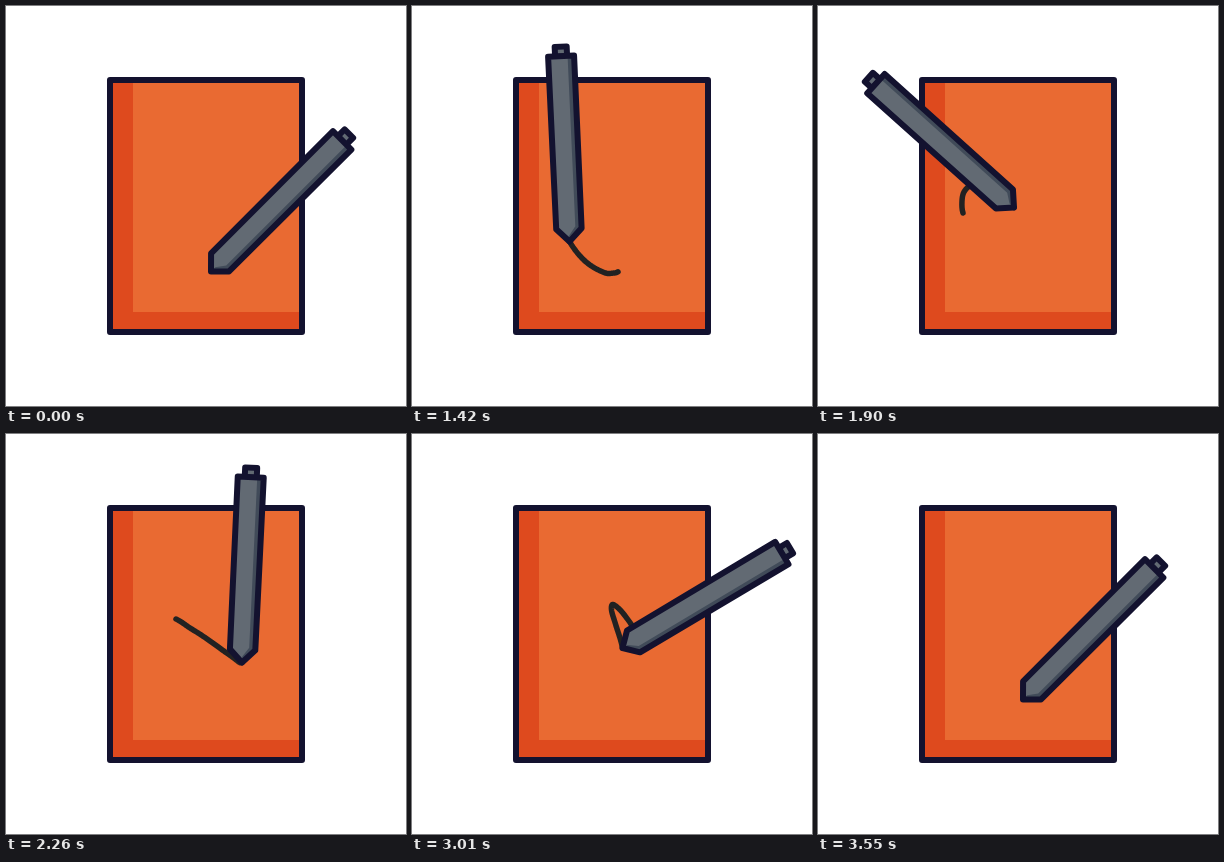
Recreate the animation shown at these times as an HTML page. Size 400 px wide and 400 px high, loop 3.64 s.

```html
<!DOCTYPE html>
<html lang="en">
<head>
<meta charset="utf-8">
<title>Pen and paper</title>
<style>
  html, body { margin: 0; width: 100%; height: 100%; overflow: hidden; background: #fff; }
  svg { display: block; width: 100%; height: 100%; }
  .outline { stroke: #13122f; stroke-width: 6; stroke-linejoin: round; }
</style>
</head>
<body>
<svg viewBox="0 0 400 400">
  <path fill="#e96a32" d="M104 74H296V326H104Z"/>
  <path fill="#de4a1e" d="M104 74H127V306H296V326H104Z"/>
  <path class="outline" fill="none" d="M104 74H296V326H104Z"/>
  <path id="ink" fill="none" stroke="#222" stroke-width="5.5" stroke-linecap="round" stroke-linejoin="round"/>
  <g id="pen">
    <path class="outline" fill="#626a73" d="M-6-185V-195H6V-185Z"/>
    <path fill="#626a73" d="M0 0L-12.7-12.8L-13-185.5H13L12.7-12.8Z"/>
    <path fill="#414b59" d="M0 0V-6L6.5-15V-185.5H13L12.7-12.8Z"/>
    <path class="outline" fill="none" d="M0 0L-12.7-12.8L-13-185.5H13L12.7-12.8Z"/>
  </g>
</svg>
<script>
const LOOP = 3640, START = 1000, END = 3550, STEP = 30;

// time, tip x, tip y, tilt in degrees
const poses = [
  [1000, 205, 265.5, 45], [1030, 206, 265.8, 44.7], [1120, 202, 267, 40],
  [1210, 192, 266.5, 31], [1330, 173, 255, 13], [1420, 157.5, 235.5, -2.6],
  [1505, 145, 207, -17], [1540, 144, 195, -23], [1580, 146, 186, -29],
  [1640, 153, 180, -37], [1740, 170, 185, -46], [1830, 184, 194, -49.3],
  [1900, 196, 201.5, -48.1], [2080, 225, 222, -32], [2260, 236, 228.5, 2.7],
  [2350, 234, 215, 20], [2450, 223, 196, 36], [2550, 210, 178, 48],
  [2640, 201, 170.5, 56.5], [2720, 199.5, 176, 59], [2850, 203.5, 190, 60.5],
  [3010, 210.5, 214, 59.2], [3160, 215, 248, 55.5], [3270, 212, 262, 52],
  [3380, 204, 267, 48.5], [3460, 200, 266.5, 46.5], [3550, 205, 265.5, 45]
];

// time, moment at which the oldest visible ink was drawn
const fades = [
  [1000, 1030], [1420, 1030], [1540, 1290], [1900, 1505], [2260, 1740],
  [2620, 1950], [3010, 2450], [3160, 2620], [3550, 3550]
];

const segment = (keys, t) => {
  const next = keys.findIndex(key => key[0] > t);
  return (next < 0 ? keys.length - 1 : next) - 1;
};

function slope(i, channel) {
  const before = poses[i - 1], after = poses[i + 1];
  return before && after ? (after[channel] - before[channel]) / (after[0] - before[0]) : 0;
}

function pose(t) {
  const i = segment(poses, t), a = poses[i], b = poses[i + 1];
  const span = b[0] - a[0], u = (t - a[0]) / span, v = 1 - u;
  return [1, 2, 3].map(c =>
    v * v * (1 + 2 * u) * a[c] + u * u * (3 - 2 * u) * b[c] +
    span * u * v * (v * slope(i, c) - u * slope(i + 1, c)));
}

function inkStart(t) {
  const i = segment(fades, t), [t0, s0] = fades[i], [t1, s1] = fades[i + 1];
  return s0 + (s1 - s0) * (t - t0) / (t1 - t0);
}

function trace(from, to) {
  if (to <= from) return "";
  const points = [];
  for (let t = from; t < to; t += 8) points.push(pose(t).slice(0, 2));
  points.push(pose(to).slice(0, 2));
  return "M" + points.join("L");
}

const ink = document.getElementById("ink");
const pen = document.getElementById("pen");

function draw(now) {
  const stepped = START + STEP * Math.floor((now % LOOP - START) / STEP);
  const t = Math.min(END, Math.max(START, stepped));
  const [x, y, tilt] = pose(t);
  pen.setAttribute("transform", `translate(${x} ${y}) rotate(${tilt})`);
  ink.setAttribute("d", trace(inkStart(t), t));
}

const begin = performance.now();
function tick() {
  draw(performance.now() - begin);
  requestAnimationFrame(tick);
}
tick();
</script>
</body>
</html>
```
